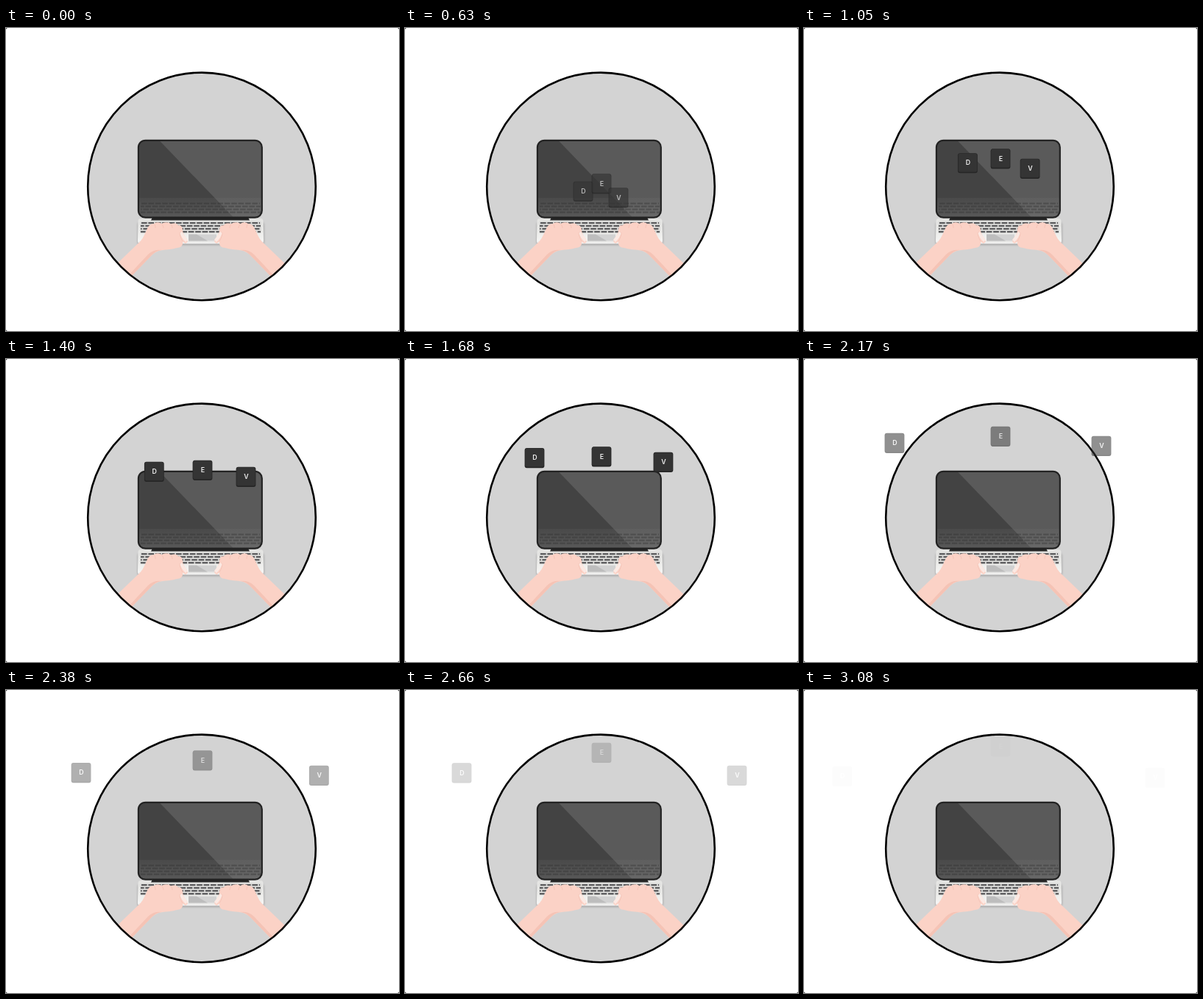
Write an HTML page that moves like this. It is 534 px wide and 412 px high and loops after 3.15 s.

```html
<!DOCTYPE html>
<html lang="en">
<head>
<meta charset="utf-8">
<title>Typing keys</title>
<style>
  html, body { margin: 0; width: 100%; height: 100%; overflow: hidden; background: #222; }
  svg { display: block; width: 534px; height: 412px; background: #fff; border-radius: 2.5px; }
  .key text { font: 600 8.8px Inter, "Liberation Sans", sans-serif; fill: #eee; text-anchor: middle; }
</style>
</head>
<body>
<svg viewBox="0 0 534 412">
  <defs>
    <clipPath id="disc"><circle cx="266" cy="215.4" r="154.5"/></clipPath>
    <clipPath id="panel"><rect x="180.5" y="153.5" width="166.5" height="103.5" rx="9"/></clipPath>
    <linearGradient id="glow" x2="0" y2="1">
      <stop offset="0" stop-color="#888" stop-opacity=".1"/>
      <stop offset="1" stop-color="#888" stop-opacity=".32"/>
    </linearGradient>
    <linearGradient id="base" x2="0" y2="1">
      <stop offset="0" stop-color="#e4e4e2"/>
      <stop offset=".75" stop-color="#f1f1ef"/>
      <stop offset="1" stop-color="#f8f8f8"/>
    </linearGradient>
    <filter id="soft" x="-10%" y="-40%" width="120%" height="180%"><feGaussianBlur stdDeviation="1.6"/></filter>

    <g id="rows" fill="none" stroke-width="2.3" stroke-dasharray="7.6 1.8">
      <path d="M184 265.2H345"/>
      <path d="M183 269.2H346" stroke-dashoffset="3"/>
      <path d="M183 273.2H346" stroke-dashoffset="6"/>
      <path d="M183 277.2H346" stroke-dashoffset="1"/>
    </g>

    <g id="hand">
      <path d="M143 328L181 291.5C186 287 188 281 191 275C193 269 197 265 201 266.5
               C203 263.5 209 263.5 211.5 266.5C214 263.5 221 263.5 224 266.5
               C228 264.5 233 265.5 234 268.5C238 267.5 240 271 240 275
               C240 279 243 283 246 287C248 291 245 294 242 292L240 290
               C241 295 238 299 232 299C226 301 219 301 213 302
               C205 303 201 306 197 310L167 341Z"/>
      <path d="M163 340L192 309C198 303 203 301.5 212 301.8C204 303 201 306 197 310L167 341Z" fill="#f5c3b5"/>
      <path d="M211.5 266.5C213 268 214 270 214 272M224 266.5C225 268 226 270 226 272M201 266.5C203 268 203 270 203 272"
            fill="none" stroke="#f3bfb1" stroke-width=".8"/>
      <path d="M240 290C237 285 236 281 236 278" fill="none" stroke="#f3c2b5" stroke-width=".8"/>
      <path d="M239 277Q242 282 247 288L244 291Q238 285 236.5 279Z" fill="#fbe9e3"/>
    </g>
  </defs>

  <circle cx="266" cy="215.4" r="154.8" fill="#d3d3d3"/>

  <rect x="179" y="264" width="171.5" height="31" rx="4" fill="#777" opacity=".5" filter="url(#soft)"/>
  <path d="M183 259H346Q349.5 259 349.5 263L350 289Q350 293.3 346 293.3H183Q179 293.3 179 289L179.5 263Q179.5 259 183 259Z" fill="url(#base)"/>
  <path d="M181 291H348" stroke="#dcdcda" stroke-width="1"/>
  <rect x="182" y="262.8" width="165" height="16" rx="1.5" fill="#dadad8"/>
  <use href="#rows" stroke="#5c5c5e"/>
  <rect x="248" y="280.5" width="38" height="9" fill="#d2d2d2"/>
  <path d="M248 280.5H259L274 289.5H248Z" fill="#bdbdbd"/>
  <path d="M199 257.5H329L331 261.5H197Z" fill="#252525"/>

  <rect x="179.9" y="152.8" width="167.9" height="104.9" rx="9.5" fill="#434343"/>
  <g clip-path="url(#panel)">
    <path d="M206.5 151H350V260H311.5Z" fill="#5a5a5a"/>
    <rect x="180" y="231" width="169" height="28" fill="url(#glow)"/>
    <use href="#rows" y="-26.5" stroke="#2e2e2e" opacity=".36"/>
  </g>
  <rect x="179.9" y="152.8" width="167.9" height="104.9" rx="9.5" fill="none" stroke="#222" stroke-width="2.2"/>

  <g clip-path="url(#disc)" fill="#fbd2c6">
    <use href="#hand"/>
    <use href="#hand" transform="translate(530) scale(-1 1)"/>
  </g>
  <circle cx="266" cy="215.4" r="154.8" fill="none" stroke="#000" stroke-width="2.6"/>
  <g id="keys"></g>
</svg>
<script>
  const LOOP = 3150, STEP = 70;
  const times = [0, 630, 1400, 1890, 2170, 2660, 3080];
  const paths = {
    D: { x: [262, 242, 201.3, 154, 123, 77, 52], y: [275, 222, 153, 123, 114, 112.5, 117] },
    E: { x: [267, 267, 267, 267, 267, 267, 267], y: [266, 211.5, 151, 120, 105, 85, 76.5] },
    V: { x: [270, 290, 326, 373, 404, 451, 477], y: [288, 230.5, 160, 128, 118, 116, 119] }
  };
  const fade = [[0, 0], [630, .66], [1050, 1], [1710, 1], [1890, .82], [2170, .54], [2660, .18], [3080, .01]];

  const layer = document.getElementById('keys');
  const keys = Object.entries(paths).map(([letter, path]) => {
    const g = document.createElementNS('http://www.w3.org/2000/svg', 'g');
    g.setAttribute('class', 'key');
    g.innerHTML = `<rect x="-13.4" y="-13.3" width="26.8" height="27.2" rx="3" fill="#262626"/>
      <rect x="-12.6" y="-12.7" width="25.2" height="24.9" rx="2.5" fill="#343434"/>
      <text x=".4" y="3">${letter}</text>`;
    layer.append(g);
    return { g, path };
  });

  const slope = (v, i) => {
    const a = Math.max(i - 1, 0), b = Math.min(i + 1, v.length - 1);
    return (v[b] - v[a]) / (times[b] - times[a]);
  };

  // Cubic Hermite curve through the given values
  function curve(v, t) {
    let i = 0;
    while (i < times.length - 2 && t >= times[i + 1]) i++;
    const h = times[i + 1] - times[i], u = (t - times[i]) / h, w = 1 - u;
    return v[i] * (1 + 2 * u) * w * w + v[i + 1] * u * u * (3 - 2 * u)
      + h * u * w * (slope(v, i) * w - slope(v, i + 1) * u);
  }

  function alpha(t) {
    const i = Math.max(1, fade.findIndex(p => p[0] >= t));
    const [t0, a] = fade[i - 1], [t1, b] = fade[i];
    return a + (b - a) * (t - t0) / (t1 - t0);
  }

  const start = performance.now();
  function draw() {
    const t = Math.floor((performance.now() - start) % LOOP / STEP) * STEP;
    for (const { g, path } of keys) {
      g.setAttribute('transform', `translate(${curve(path.x, t)} ${curve(path.y, t)})`);
      g.setAttribute('opacity', alpha(t));
    }
    requestAnimationFrame(draw);
  }
  draw();
</script>
</body>
</html>
```
